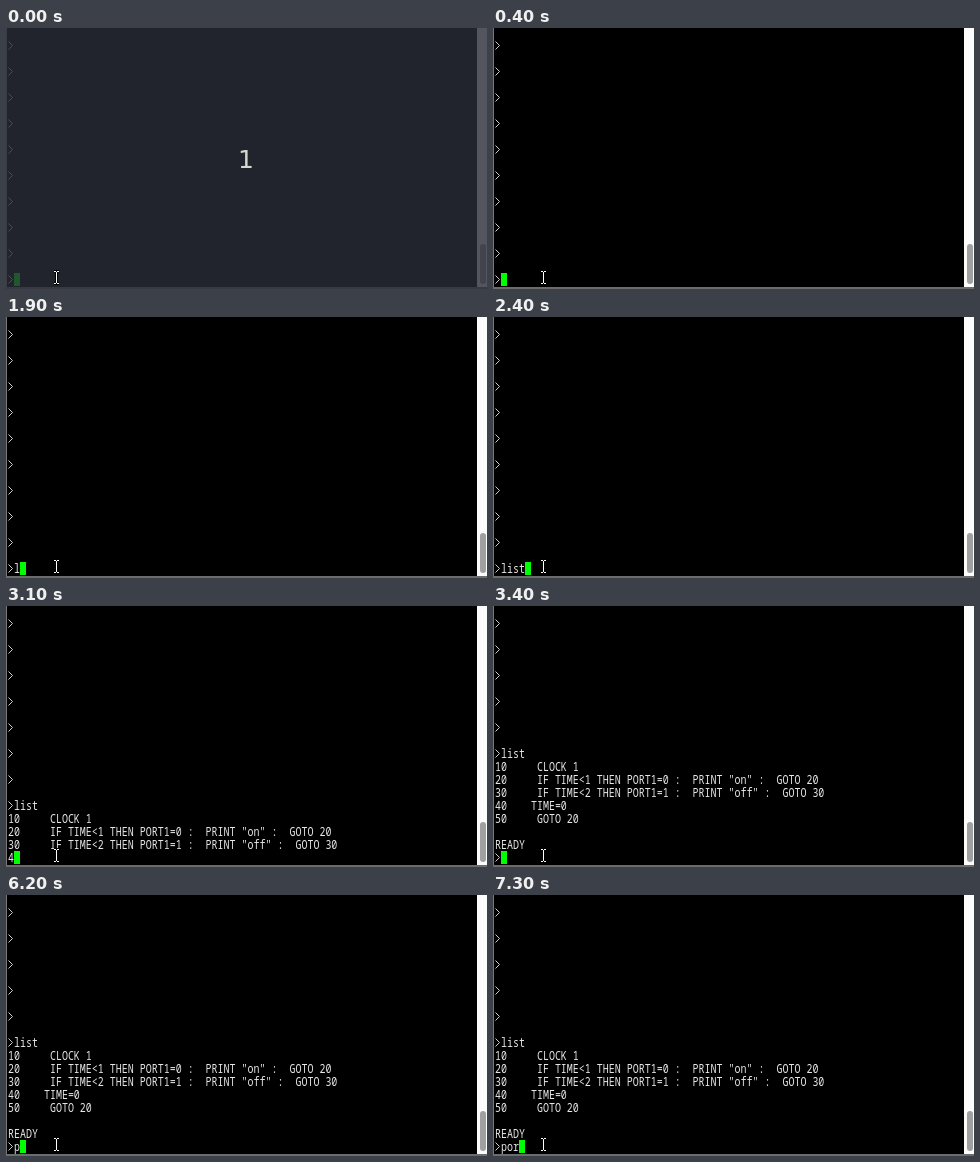
An HTML page that plays this animation: 481 by 261 pixels, repeating every 8000 ms.

```html
<!DOCTYPE html>
<html lang="en">
<head>
<meta charset="utf-8">
<title>Terminal listing</title>
<style>
  html, body { margin: 0; width: 100%; height: 100%; overflow: hidden; background: #000; }
  svg { display: block; width: 100vw; height: 100vh; }
  .line { font: 10px "Noto Sans Mono", "Liberation Mono", monospace; fill: #e6e6e6; white-space: pre; }
  .prompt { fill: none; stroke: #cfcfcf; }
  .count { font: 25px "DejaVu Sans", sans-serif; fill: #d3d9d0; text-anchor: middle; }
</style>
</head>
<body>
<svg viewBox="0 0 481 261">
  <rect width="481" height="261"/>
  <g id="screen"></g>
  <rect id="cursor" width="6" height="13" fill="#0f0"/>
  <rect width="1" height="261" fill="#777"/>
  <rect x="471" width="10" height="261" fill="#fcfcfc"/>
  <rect x="474" y="216" width="6" height="40" rx="3" fill="#a0a0a0"/>
  <rect y="259" width="481" height="2" fill="#6c6c6c"/>
  <g id="countdown">
    <rect width="481" height="261" fill="#2a2e37" opacity=".8"/>
    <text class="count" x="240" y="140">1</text>
  </g>
  <g fill="none">
    <path d="M48 243.5h5M50.5 243v13M48 255.5h5" stroke="#000" stroke-width="3"/>
    <path d="M48 243.5h2m1 0h2M50.5 244v11M48 255.5h2m1 0h2" stroke="#fff"/>
  </g>
</svg>
<script>
const LOOP = 8000, ROWS = 20, COL = 6, ROW = 13, LEFT = 2, TOP = -2;
const NS = "http://www.w3.org/2000/svg";
const listing = [
  "",
  "10     CLOCK 1",
  '20     IF TIME<1 THEN PORT1=0 :  PRINT "on" :  GOTO 20',
  '30     IF TIME<2 THEN PORT1=1 :  PRINT "off" :  GOTO 30',
  "40    TIME=0",
  "50     GOTO 20",
  "",
  "READY",
  ">"
].join("\n");

// Each step: start time, value
const typed = [[0, ""], [1900, "l"], [2200, "lis"], [2400, "list"]];
const printed = [[0, 0], [2900, 42], [3000, 84], [3100, 128], [3400, listing.length]];
const next = [[0, ""], [6200, "p"], [7300, "por"]];
const at = (steps, t) => steps.filter(s => s[0] <= t).pop()[1];

// Empty prompts, each after a blank row
const prompts = "\n\n>".repeat(ROWS / 2);
const $ = id => document.getElementById(id);

function add(tag, attrs) {
  const el = document.createElementNS(NS, tag);
  for (const k in attrs) el.setAttribute(k, attrs[k]);
  return $("screen").appendChild(el);
}

const rows = Array.from({ length: ROWS }, (_, i) => {
  const y = TOP + i * ROW;
  return {
    prompt: add("path", { class: "prompt", d: `M2.5 ${y + 2.5}l4 4l-4 4` }),
    text: add("text", { class: "line" }),
    base: y + 11
  };
});

function setRow({ prompt, text, base }, line) {
  const isPrompt = line.startsWith(">");
  const x = LEFT + (isPrompt ? COL : 0);
  prompt.style.display = isPrompt ? "" : "none";
  text.textContent = isPrompt ? line.slice(1) : line;
  text.setAttribute("transform", `translate(${x} ${base}) scale(1 1.25)`);
}

let shown = null;
function render(t) {
  $("countdown").style.display = t < 400 ? "" : "none";
  const output = prompts + at(typed, t) + listing.slice(0, at(printed, t)) + at(next, t);
  if (output === shown) return;
  shown = output;
  const lines = output.split("\n").slice(-ROWS);
  rows.forEach((row, i) => setRow(row, lines[i]));
  $("cursor").setAttribute("x", LEFT + lines[ROWS - 1].length * COL);
  $("cursor").setAttribute("y", TOP + (ROWS - 1) * ROW);
}

const start = performance.now();
function tick(now) {
  render(Math.max(0, now - start) % LOOP);
  requestAnimationFrame(tick);
}
render(0);
requestAnimationFrame(tick);
</script>
</body>
</html>
```
